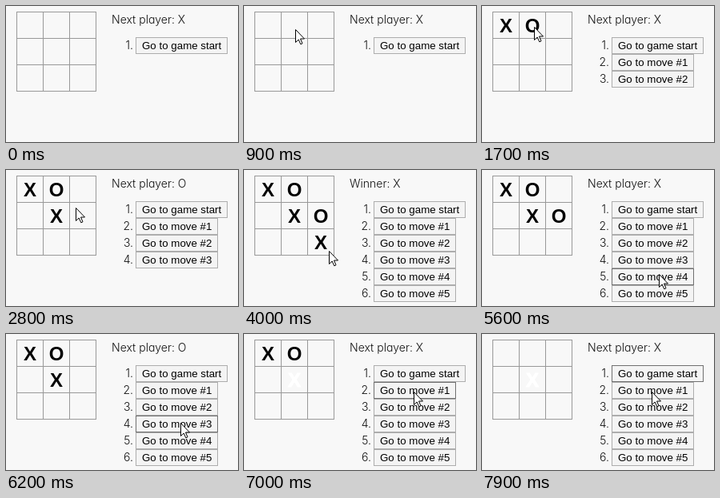
Animation, 290 px wide and 170 px high, one loop 8000 ms. Source, as an HTML page:

```html
<!DOCTYPE html>
<html lang="en">
<head>
<meta charset="utf-8">
<title>Tic-tac-toe with history</title>
<style>
html, body { margin: 0; width: 100%; height: 100%; overflow: hidden; background: #f8f8f8; }
svg { display: block; width: 290px; height: 170px; }
.info { font: 300 14px Inter, Lato, sans-serif; font-feature-settings: "cv11"; fill: #111; }
.btn { font: 13.333px "Liberation Sans", Arial, sans-serif; fill: #000; }
.mark { font: bold 24px "Liberation Sans", Arial, sans-serif; text-anchor: middle; }
.num { text-anchor: end; }
</style>
</head>
<body>
<svg id="stage" viewBox="0 0 290 170"></svg>
<script>
const LOOP = 8000, STEP = 100, ROW = 21, CELL = 33, LAST = 5;
const stage = document.getElementById('stage');

const moves = [0, 1, 4, 5, 8].map((cell, i) => ({ player: 'XO'[i % 2], cell }));

// Five clicks on the board, then an even walk back up the list
const clicks = [1100, 1700, 2300, 3100, 3600];
const undo = [0, 1, 2, 3, 4].map(k => 5500 + 550 * k);
clicks.push(...undo);

// Pointer glides: begin, end, x, y
const glides = [
  [400, 400, 213, 70], [400, 1200, 40, 22], [1200, 1400, 65, 26],
  [1900, 2200, 69, 52], [2600, 2800, 87, 47], [3100, 3400, 100, 88],
  [3900, 4000, 106, 101], [4000, 4100, 215, 145], [4300, 4800, 222, 151]
];
undo.forEach((t, k) => glides.push([t - 350, t - 150, 221 - 3 * k, 130 - 19.5 * k]));
glides.push([7800, 7900, 212, 72]);

function add(parent, tag, attrs, text) {
  const el = document.createElementNS('http://www.w3.org/2000/svg', tag);
  for (const k in attrs) el.setAttribute(k, attrs[k]);
  if (text) el.textContent = text;
  parent.appendChild(el);
  return el;
}

function show(el, on) {
  el.style.display = on ? '' : 'none';
}

const grid = [0, 1, 2, 3].map(i =>
  `M13 ${7.5 + CELL * i}H113M${13.5 + CELL * i} 7V107`).join('');
add(stage, 'path', { d: grid, stroke: '#999', fill: 'none', 'shape-rendering': 'crispEdges' });

function mark({ player, cell }, fill) {
  const x = 30 + CELL * (cell % 3), y = CELL + CELL * Math.floor(cell / 3);
  return add(stage, 'text', { class: 'mark', x, y, fill }, player);
}
const ghost = mark(moves[2], '#fff');
ghost.setAttribute('stroke', '#fff');
const marks = moves.map(m => mark(m, '#000'));

const status = add(stage, 'text', { class: 'info', x: 132, y: 22 });

const rows = Array.from({ length: LAST + 1 }, (_, i) => {
  const g = add(stage, 'g', {}), y = 39 + ROW * i, w = i ? 103 : 115;
  add(g, 'text', { class: 'info num', x: 159, y: y + 15 }, `${i + 1}.`);
  const box = add(g, 'rect', { x: 162.5, y: y + 0.5, width: w - 1, height: ROW - 1 });
  add(g, 'text', { class: 'btn', x: 170, y: y + 15 }, i ? `Go to move #${i}` : 'Go to game start');
  return { g, box, y, w };
});

const pointer = add(stage, 'path', {
  d: 'M.5 .5V16.5L4.2 13L6.8 18.8L9 17.8L6.5 12H11.5Z',
  fill: '#fff', stroke: '#000'
});

function pointerAt(t) {
  let [, , x, y] = glides[0];
  for (const [from, to, gx, gy] of glides.slice(1)) {
    if (t <= from) break;
    const rest = 1 - Math.min(1, (t - from) / (to - from));
    const k = 1 - rest * rest;
    x += (gx - x) * k;
    y += (gy - y) * k;
  }
  return [Math.round(x), Math.round(y)];
}

function draw(t) {
  const done = clicks.filter(c => c <= t).length;
  const count = LAST - Math.abs(LAST - done);
  const visible = t >= glides[0][0];
  const pressed = undo.some(c => t < c && t >= c - STEP);

  marks.forEach((m, i) => show(m, i < count));
  show(ghost, done > LAST && count < 3);
  status.textContent = count === LAST ? 'Winner: X' : `Next player: ${'XO'[count % 2]}`;

  // Buttons react one step after the pointer
  const [hx, hy] = pointerAt(t - STEP);
  rows.forEach((r, i) => {
    const over = t > glides[0][0] && hx >= 162 && hx < 162 + r.w && hy >= r.y && hy < r.y + ROW;
    show(r.g, i <= done);
    r.box.setAttribute('fill', over && pressed ? '#e6e6e6' : '#f4f4f4');
    r.box.setAttribute('stroke', over ? '#707070' : '#adadad');
  });

  show(pointer, visible);
  pointer.setAttribute('transform', `translate(${pointerAt(t)})`);
}

const start = performance.now();
function tick() {
  const t = (performance.now() - start) % LOOP;
  draw(Math.floor(t / STEP) * STEP);
  requestAnimationFrame(tick);
}
tick();
</script>
</body>
</html>
```
